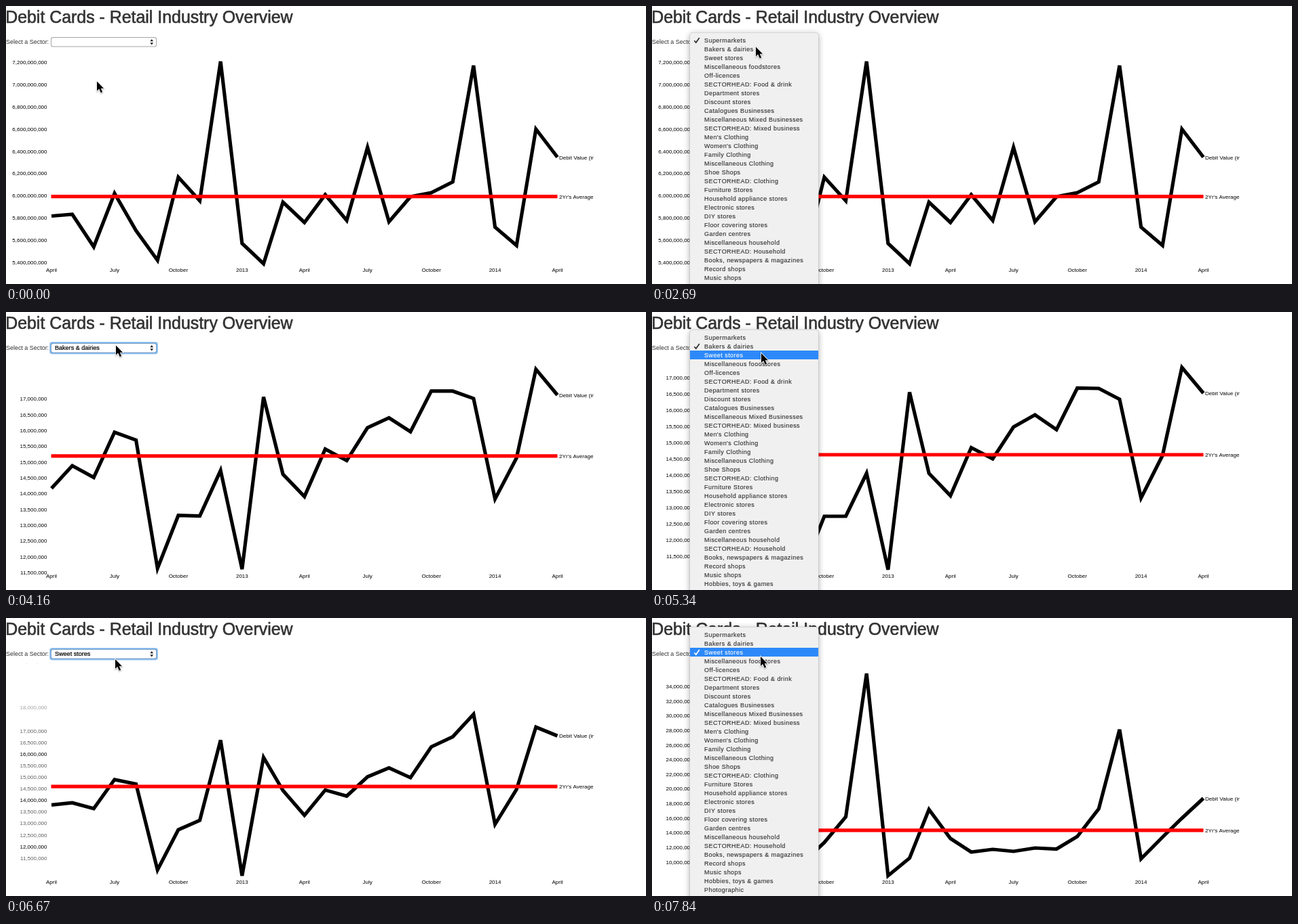
Recreate the animation shown at these times as an HTML page with a canvas. Size 943 by 411 pixels, loop 7990 ms.

```html
<!DOCTYPE html>
<html lang="en">
<head>
<meta charset="utf-8">
<title>Debit Cards</title>
<style>
html, body { margin: 0; width: 100%; height: 100%; overflow: hidden; background: #fff; }
canvas { display: block; }
</style>
</head>
<body>
<canvas id="stage" width="943" height="411"></canvas>
<script>
const g = document.getElementById('stage').getContext('2d');
const LOOP = 7990;
const SANS = '"Liberation Sans", Arial, sans-serif';
const BLUE = '#2d89f9';

const ITEMS = ['Supermarkets', 'Bakers & dairies', 'Sweet stores', 'Miscellaneous foodstores',
  'Off-licences', 'SECTORHEAD: Food & drink', 'Department stores', 'Discount stores',
  'Catalogues Businesses', 'Miscellaneous Mixed Businesses', 'SECTORHEAD: Mixed business',
  "Men's Clothing", "Women's Clothing", 'Family Clothing', 'Miscellaneous Clothing', 'Shoe Shops',
  'SECTORHEAD: Clothing', 'Furniture Stores', 'Household appliance stores', 'Electronic stores',
  'DIY stores', 'Floor covering stores', 'Garden centres', 'Miscellaneous household',
  'SECTORHEAD: Household', 'Books, newspapers & magazines', 'Record shops', 'Music shops',
  'Hobbies, toys & games', 'Photographic'];

// Per sector: monthly heights, axis scale (y = base - slope * millions) and tick range
const SECTORS = [
  { ys: [310.5, 308, 356, 277, 332, 376, 253, 288, 82, 351, 381, 290, 320,
         279, 317, 209, 319, 282, 276, 260, 88, 327, 354, 182, 223.5],
    base: 1267, slope: 0.16444, first: 5400, last: 7200, step: 200 },
  { ys: [259.5, 225, 241.5, 175, 185.5, 379, 302, 302, 238.5, 381, 118.5, 238.5, 271.5,
         200.5, 217, 170, 152, 174, 112.5, 113, 129, 275, 212, 82, 120],
    base: 913, slope: 48, first: 11.5, last: 17, step: 0.5 },
  { ys: [305, 355, 350, 347.5, 347.5, 361, 332, 294, 82, 381, 355, 283, 326,
         346, 342, 345, 340, 341.5, 323, 282, 165, 356, 324, 296, 266.5],
    base: 468.7, slope: 10.8125, first: 10, last: 34, step: 2 }
];

const MENUS = [
  { open: 1775, hover: 2220, blink: 2660, fade: 2835, sel: 0 },
  { open: 4740, hover: 5185, fade: 5895, sel: 1 },
  { open: 7855, hover: 9999, fade: 9999, sel: 2 }
];
const FADE = 250, MORPH_DELAY = 100, MORPH = 1500, FOCUS = 885;

// time, x, y
const POINTER = [[0, 134, 111.5], [593, 156, 52.5], [2100, 156, 52.5], [2370, 153, 60.5],
  [2950, 153, 60.5], [3410, 162, 49.5], [5050, 162, 49.5], [5338, 161, 61],
  [6970, 161, 61], [7500, 160, 57]];

const clamp = v => Math.max(0, Math.min(1, v));
const lerp = (a, b, p) => a + (b - a) * p;
const cubic = t => t < 0.5 ? 4 * t ** 3 : 1 - 4 * (1 - t) ** 3;

const START = Date.UTC(2012, 3, 1);
const monthX = i => 67 + (Date.UTC(2012, 3 + i, 1) - START) / 864e5 * 1.0212;

function text(s, x, y, size, color = '#000', align = 'left', heavy = 0) {
  g.font = size + 'px ' + SANS;
  g.textAlign = align;
  g.fillStyle = g.strokeStyle = color;
  g.fillText(s, x, y);
  if (heavy) {
    g.lineWidth = heavy;
    g.strokeText(s, x, y);
  }
}

function box(x, y, w, h, r, fill) {
  g.beginPath();
  g.roundRect(x, y, w, h, r);
  g.fillStyle = fill;
  g.fill();
}

function line(points, color, width) {
  g.beginPath();
  points.forEach(([x, y]) => g.lineTo(x, y));
  g.strokeStyle = color;
  g.lineWidth = width;
  g.stroke();
}

function ticks(s) {
  const n = Math.round((s.last - s.first) / s.step);
  return Array.from({ length: n + 1 }, (_, i) => s.first + i * s.step);
}

function drawAxis(a, b, p) {
  const from = ticks(a), to = ticks(b);
  for (const v of new Set([...from, ...to])) {
    const y = lerp(a.base - a.slope * v, b.base - b.slope * v, p);
    g.globalAlpha = !to.includes(v) ? 1 - p : !from.includes(v) ? p : 1;
    text((v * 1e6).toLocaleString('en-US'), 60.5, y + 3, 8, '#000', 'right');
  }
  g.globalAlpha = 1;
}

function drawChart(a, b, p) {
  const ys = a.ys.map((y, i) => lerp(y, b.ys[i], p));
  const mean = ys.reduce((sum, y) => sum + y) / ys.length;
  g.save();
  g.beginPath();
  g.rect(0, 67, 866, 334);
  g.clip();
  g.miterLimit = 4;
  drawAxis(a, b, p);
  ['April', 'July', 'October', '2013', 'April', 'July', 'October', '2014', 'April']
    .forEach((s, i) => text(s, monthX(i * 3), 392.5, 8, '#000', 'center'));
  line(ys.map((y, i) => [monthX(i), y]), '#000', 5.2);
  line([[66.5, mean], [812.5, mean]], '#f00', 5.2);
  text('Debit Value (in', 815, ys[24] + 3, 8.1);
  text("2Yr's Average", 815, mean + 3, 8.1);
  g.restore();
}

function drawSelect(label, focused) {
  if (focused) {
    box(64, 44, 160, 18.5, 4, '#a9cff5');
    box(65, 45, 158, 16.5, 3.5, '#74b0ee');
  }
  box(66, 46, 156, 14.5, 3, focused ? '#8aa6c4' : '#a6a6a6');
  box(67, 47, 154, 12.5, 2.5, '#fff');
  g.fillStyle = '#222';
  for (const d of [-1, 1]) {
    g.beginPath();
    g.moveTo(212.3, 53.3 + d);
    g.lineTo(217.1, 53.3 + d);
    g.lineTo(214.7, 53.3 + d * 4.2);
    g.fill();
  }
  text(label, 72, 56.4, 9.05, '#000', 'left', 0.2);
}

function drawMenu(m, t) {
  const top = 39 - 13 * m.sel;
  const blinking = t >= m.blink && t < m.blink + 100;
  const lit = blinking ? -1 : m.sel + (t >= m.hover ? 1 : 0);
  g.save();
  g.globalAlpha = 1 - clamp((t - m.fade) / FADE);
  g.shadowColor = 'rgba(0,0,0,.32)';
  g.shadowBlur = 8;
  g.shadowOffsetY = 2;
  box(55.5, top, 190, 460, 5, '#c4c4c4');
  g.shadowColor = 'transparent';
  box(56, top + 0.5, 189, 460, 4.5, '#f0f0f0');
  g.letterSpacing = '0.45px';
  ITEMS.forEach((s, i) => {
    const y = top + 11.5 + i * 13;
    const color = i === lit ? '#fff' : '#2e2e2e';
    if (i === lit) box(56, y - 6.5, 189, 13, 0, BLUE);
    text(s, 77, y + 3.3, 9, color, 'left', 0.12);
    if (i === m.sel) line([[62.3, y + 0.8], [64.8, y + 3.6], [69.8, y - 3.6]], color, 1.7);
  });
  g.restore();
}

function drawPointer(t) {
  let i = POINTER.findIndex(k => k[0] > t);
  if (i < 0) i = POINTER.length - 1;
  const [t0, x0, y0] = POINTER[i - 1], [t1, x1, y1] = POINTER[i];
  const p = clamp((t - t0) / (t1 - t0));
  g.save();
  g.translate(lerp(x0, x1, p), lerp(y0, y1, p));
  g.shadowColor = 'rgba(0,0,0,.35)';
  g.shadowBlur = 2;
  g.shadowOffsetY = 1;
  const arrow = new Path2D('M0 0V14L3.2 11.1L5.7 16.8L8.2 15.7L5.8 10.2H10Z');
  g.lineWidth = 1.6;
  g.strokeStyle = '#fff';
  g.stroke(arrow);
  g.shadowColor = 'transparent';
  g.fillStyle = '#000';
  g.fill(arrow);
  g.restore();
}

function draw(t) {
  g.fillStyle = '#fff';
  g.fillRect(0, 0, 943, 411);
  text('Debit Cards - Retail Industry Overview', -0.8, 25.3, 24.9, '#333', 'left', 0.6);
  text('Select a Sector:', 0, 56.3, 8.95, '#333');

  const chosen = MENUS.filter(m => t >= m.fade).length;
  const prev = Math.max(0, chosen - 1);
  const p = chosen ? cubic(clamp((t - MENUS[prev].fade - MORPH_DELAY) / MORPH)) : 1;
  drawChart(SECTORS[prev], SECTORS[chosen], p);
  drawSelect(chosen ? ITEMS[chosen] : '', t >= FOCUS);

  const menu = MENUS.find(m => t >= m.open && t < m.fade + FADE);
  if (menu) drawMenu(menu, t);
  drawPointer(t);
}

function tick(now) {
  draw(Math.floor(now % LOOP / 147.9) * 148.3);
  requestAnimationFrame(tick);
}
requestAnimationFrame(tick);
</script>
</body>
</html>
```
